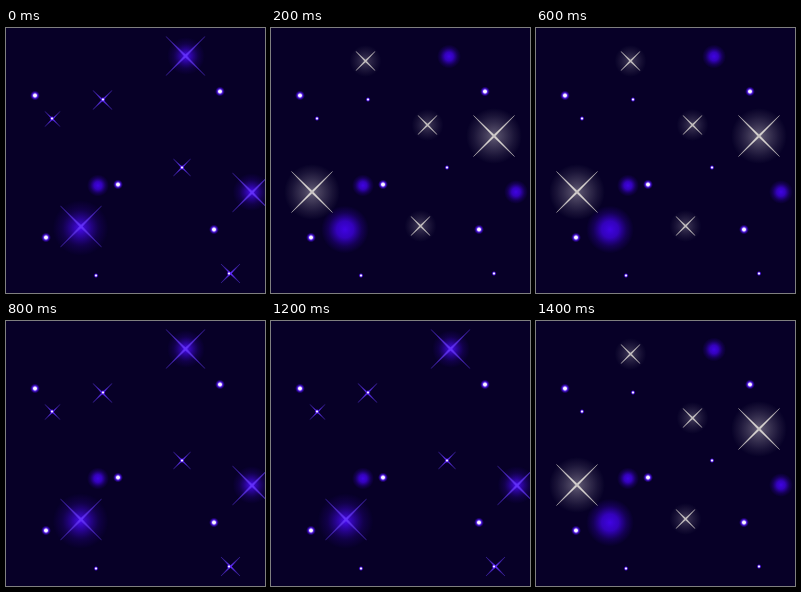
Write an HTML page without scripts that moves like this. It is 259 by 265 pixels and loops after 1.6 s.

```html
<!DOCTYPE html>
<html lang="en">
<head>
<meta charset="utf-8">
<title>Twinkling stars</title>
<style>
html, body { margin: 0; width: 100%; height: 100%; overflow: hidden; background: #070027; }
svg { display: block; width: 259px; height: 265px; }
.violet, .white { animation: twinkle 400ms step-end infinite; }
.white { animation-delay: -200ms; }
@keyframes twinkle {
  0% { opacity: 1; }
  50%, 100% { opacity: 0; }
}
</style>
</head>
<body>
<svg viewBox="0 0 259 265">
  <defs>
    <radialGradient id="blue">
      <stop offset="0" stop-color="#4003e4"/>
      <stop offset=".35" stop-color="#3c02d6" stop-opacity=".85"/>
      <stop offset=".7" stop-color="#3602c0" stop-opacity=".3"/>
      <stop offset="1" stop-color="#3000b0" stop-opacity="0"/>
    </radialGradient>
    <radialGradient id="halo">
      <stop offset="0" stop-color="#4a0cf4"/>
      <stop offset=".3" stop-color="#3c06d0" stop-opacity=".7"/>
      <stop offset=".65" stop-color="#3204b0" stop-opacity=".25"/>
      <stop offset="1" stop-color="#2c00a0" stop-opacity="0"/>
    </radialGradient>
    <radialGradient id="mist">
      <stop offset="0" stop-color="#a49cac" stop-opacity=".6"/>
      <stop offset=".4" stop-color="#8c8498" stop-opacity=".38"/>
      <stop offset=".75" stop-color="#807890" stop-opacity=".15"/>
      <stop offset="1" stop-color="#807890" stop-opacity="0"/>
    </radialGradient>
    <radialGradient id="spark">
      <stop offset="0" stop-color="#fff"/>
      <stop offset=".3" stop-color="#f0e8ff"/>
      <stop offset=".5" stop-color="#6a30ff" stop-opacity=".9"/>
      <stop offset=".72" stop-color="#4408e0" stop-opacity=".5"/>
      <stop offset="1" stop-color="#3800c0" stop-opacity="0"/>
    </radialGradient>
    <radialGradient id="ray">
      <stop offset="0" stop-color="#6430ff"/>
      <stop offset="1" stop-color="#4022a8"/>
    </radialGradient>
    <circle id="dot" r="5" fill="url(#spark)"/>
    <circle id="speck" r="2.6" fill="url(#spark)"/>
    <path id="big" d="M-20.5-20.5 .7-.7 20.5 20.5-.7 .7ZM20.5-20.5 .7 .7-20.5 20.5-.7-.7Z" stroke-width=".45"/>
    <path id="small" d="M-9.5-9.5 .5-.5 9.5 9.5-.5 .5ZM9.5-9.5 .5 .5-9.5 9.5-.5-.5Z" stroke-width=".45"/>
  </defs>

  <rect width="259" height="265" fill="#070027"/>

  <circle cx="92" cy="157.5" r="11" fill="url(#blue)"/>

  <g class="violet">
    <g fill="url(#halo)">
      <circle cx="180" cy="28" r="19"/>
      <circle cx="245.5" cy="164" r="19"/>
      <circle cx="74.5" cy="200" r="28"/>
    </g>
    <g fill="url(#ray)" stroke="url(#ray)">
      <use href="#big" transform="translate(179.5 28) scale(.95)"/>
      <use href="#big" transform="translate(246 164.5) scale(.95)"/>
      <use href="#big" x="75" y="198.5"/>
      <use href="#small" x="96.5" y="72"/>
      <use href="#small" transform="translate(46.5 91) scale(.8)"/>
      <use href="#small" transform="translate(176 139.5) scale(.9)"/>
      <use href="#small" x="224.5" y="245.5"/>
    </g>
  </g>

  <g class="white">
    <g fill="url(#blue)">
      <circle cx="178" cy="28.5" r="12"/>
      <circle cx="245" cy="164" r="12"/>
      <circle cx="74" cy="201.5" r="24"/>
    </g>
    <g fill="url(#mist)">
      <circle cx="223" cy="108" r="28"/>
      <circle cx="41" cy="164" r="28"/>
      <circle cx="94.5" cy="33" r="16" opacity=".65"/>
      <circle cx="156.5" cy="97" r="16" opacity=".65"/>
      <circle cx="149.5" cy="198" r="16" opacity=".65"/>
    </g>
    <g fill="#d8d4d2" stroke="#b8b2b4">
      <use href="#big" x="223" y="108"/>
      <use href="#big" x="41" y="164"/>
      <use href="#small" x="94.5" y="33"/>
      <use href="#small" x="156.5" y="97"/>
      <use href="#small" x="149.5" y="198"/>
    </g>
  </g>

  <use href="#dot" x="29" y="67.5"/>
  <use href="#dot" x="214" y="63.5"/>
  <use href="#dot" x="112" y="156.5"/>
  <use href="#dot" x="40" y="209.5"/>
  <use href="#dot" x="208" y="201.5"/>
  <use href="#speck" x="97" y="71.5"/>
  <use href="#speck" x="46" y="90.5"/>
  <use href="#speck" x="176" y="139.5"/>
  <use href="#speck" x="223" y="245.5"/>
  <use href="#speck" x="90" y="247.5"/>
</svg>
</body>
</html>
```
